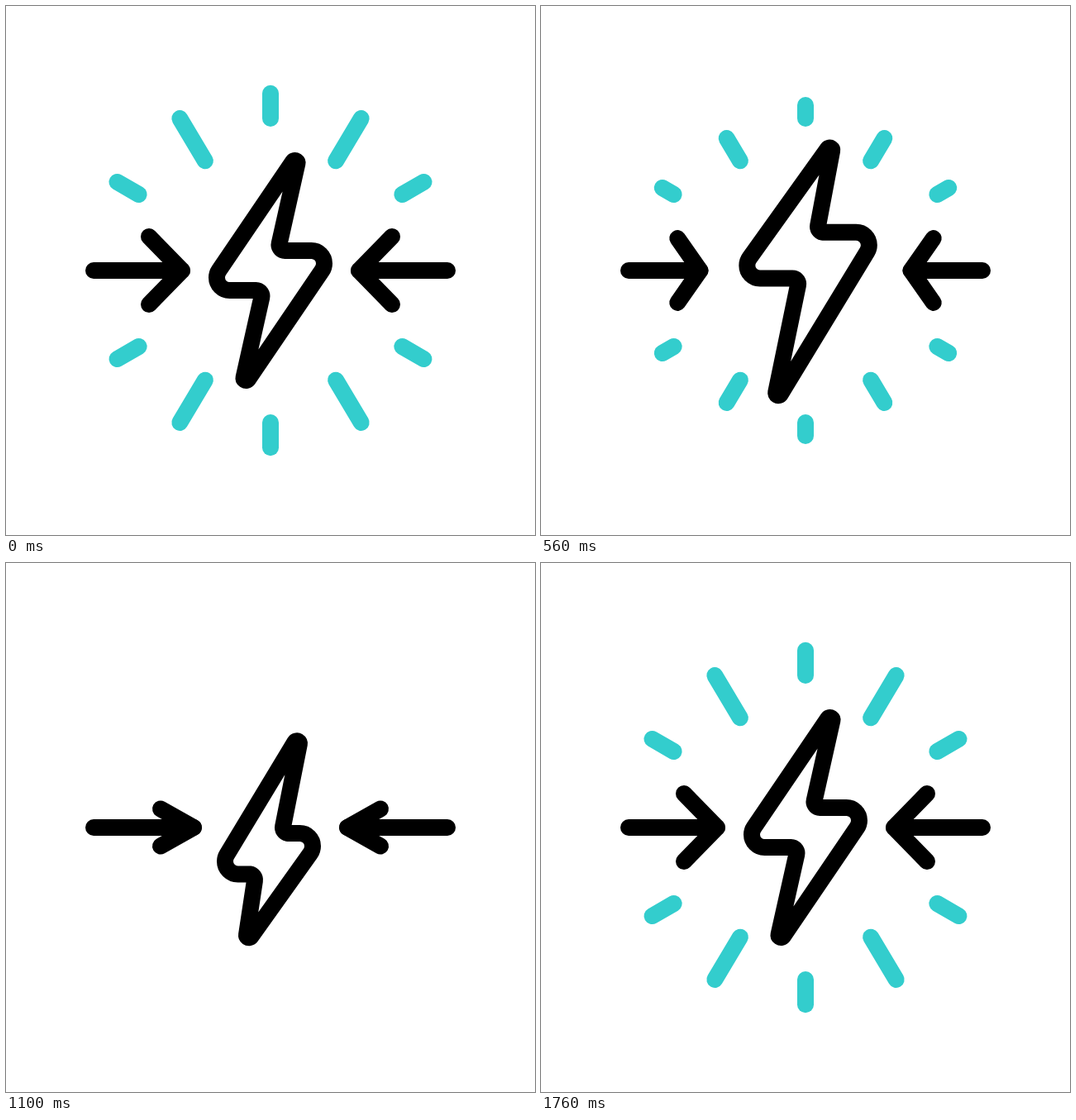
Recreate the animation shown at these times as an HTML page with a canvas. Size 640 by 640 pixels, loop 1920 ms.

```html
<!DOCTYPE html>
<html lang="en">
<head>
<meta charset="utf-8">
<title>Energy pulse</title>
<style>
  html, body { margin: 0; width: 100%; height: 100%; overflow: hidden; background: #fff; }
  canvas { display: block; width: 640px; height: 640px; }
</style>
</head>
<body>
<canvas id="stage" width="640" height="640"></canvas>
<script>
const ctx = document.getElementById('stage').getContext('2d');
const SIZE = 640, MID = SIZE / 2, LOOP = 1920, STEP = 20;
const BLACK = '#000', TEAL = '#33cdcd';

// The bolt is point-symmetric: ends lie at c ± t, elbows at m ± e, notches at m ± n.
// The arrow has a tip, a barb position and a barb height.
const rest  = { cx: 320, cy: 320, tx: 29.5, ty: -130, mx: 320, my: 320, ex: 49.5, ey: -8.5, nx: 17.5,
                tip: 213, barb: 173, rise: 41 };
const swell = { cx: 320, cy: 319.7, tx: 31.3, ty: -150.7, mx: 326.2, my: 295.2, ex: 60.9, ey: -12.7, nx: 18.3,
                tip: 188, barb: 162.5, rise: 41 };
const press = { cx: 323, cy: 334.3, tx: 29, ty: -116, mx: 318, my: 351.7, ex: 37.5, ey: -9.2, nx: 24,
                tip: 227, barb: 187, rise: 22.5 };
const TIP_R = 3, ELBOW_R = 15.5, NOTCH_R = 7;

function ease(t, from, to) {
  const u = Math.min(1, Math.max(0, (t - from) / (to - from)));
  return u * u * (3 - 2 * u);
}

// Rest pose pushed towards the swollen and the pressed one.
function blend(out, inward) {
  const pose = {};
  for (const k in rest) {
    pose[k] = rest[k] + out * (swell[k] - rest[k]) + inward * (press[k] - rest[k]);
  }
  return pose;
}

function stroke(color, points) {
  ctx.strokeStyle = color;
  ctx.beginPath();
  points.forEach(([x, y]) => ctx.lineTo(x, y));
  ctx.stroke();
}

// Closed outline made of corner circles joined by their tangents.
function drawBolt(p, shift) {
  const ny = p.ey - ELBOW_R - NOTCH_R;
  const half = s => [
    { x: p.cx + s * p.tx, y: p.cy + s * p.ty, r: TIP_R },
    { x: p.mx + s * p.nx, y: p.my + s * ny, r: -NOTCH_R },
    { x: p.mx + s * p.ex, y: p.my + s * p.ey, r: ELBOW_R }
  ];
  const corners = [...half(1), ...half(-1)];
  const normals = corners.map((a, i) => {
    const b = corners[(i + 1) % 6], dx = b.x - a.x, dy = b.y - a.y;
    return Math.atan2(dy, dx) - Math.acos((a.r - b.r) / Math.hypot(dx, dy));
  });
  ctx.strokeStyle = BLACK;
  ctx.beginPath();
  corners.forEach((c, i) => {
    const turn = c.r < 0 ? Math.PI : 0;
    ctx.arc(c.x + shift, c.y, Math.abs(c.r), normals[(i + 5) % 6] + turn, normals[i] + turn, c.r < 0);
  });
  ctx.closePath();
  ctx.stroke();
}

function drawArrows({ tip, barb, rise }) {
  for (const side of [x => x, x => SIZE - x]) {
    stroke(BLACK, [[side(106), MID], [side(tip), MID]]);
    stroke(BLACK, [[side(barb), MID - rise], [side(tip), MID], [side(barb), MID + rise]]);
  }
}

// Rays every 30 degrees, leaving room for the arrows; odd ones are long.
function drawRays(inward, burst, from, to) {
  if (to - from < 0.01) return;
  for (let k = 0; k < 12; k++) {
    if (k % 6 === 3) continue;
    const long = k % 2 === 1;
    const lean = long ? (k % 6 === 1 ? 0.8 : -0.8) : 0;
    const angle = (k * 30 + lean) * Math.PI / 180;
    const inner = long ? 154.5 : 184;
    const outer = 214.2 - inward * (long ? 8 : 4.7) + burst * (long ? 4.4 : 6);
    const at = f => {
      const r = inner + (outer - inner) * f;
      return [MID + r * Math.sin(angle), MID - r * Math.cos(angle)];
    };
    stroke(TEAL, [at(from), at(to)]);
  }
}

// Rays leave outwards, are gone at this moment, then grow from the inside again.
function raySpan(t) {
  const gone = t < 800 ? 460 : 1100;
  return t < gone ? [ease(t, gone - 160, gone), 1] : [0, ease(t, gone, gone + 190)];
}

function draw(t) {
  const squeeze = ease(t, 430, 1050), kick = ease(t, 1140, 1400);
  const windUp = ease(t, 200, 380) - squeeze;
  const inward = squeeze - kick;
  const burst = kick - ease(t, 1400, 1760);
  const sway = ease(t, 460, 700) - ease(t, 700, 900);

  ctx.fillStyle = '#fff';
  ctx.fillRect(0, 0, SIZE, SIZE);
  ctx.lineWidth = 20;
  ctx.lineCap = ctx.lineJoin = 'round';
  drawRays(inward, burst, ...raySpan(t));
  drawArrows(blend(windUp + 0.3 * burst, inward));
  drawBolt(blend(windUp + burst, inward), -5.8 * sway);
}

const start = performance.now();
function tick() {
  const t = (performance.now() - start) % LOOP;
  draw(Math.floor(t / STEP) * STEP);
  requestAnimationFrame(tick);
}
tick();
</script>
</body>
</html>
```
